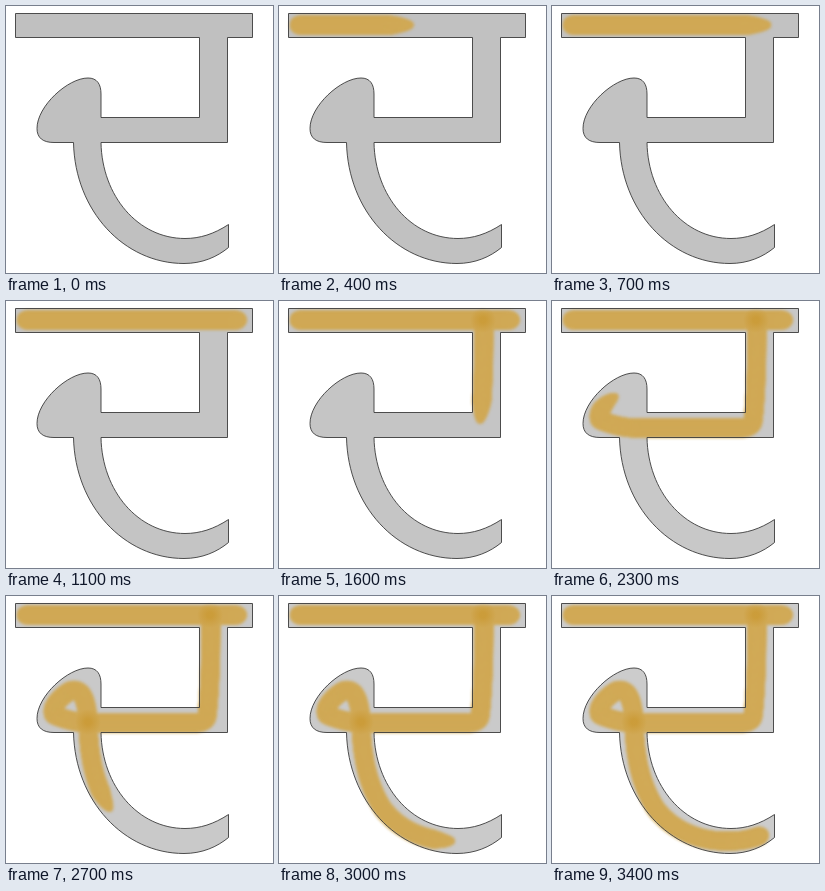
Animation of 267 by 267 pixels, one loop 3.5 s. Source, as an HTML page with a canvas:

```html
<!DOCTYPE html>
<html lang="en">
<head>
<meta charset="utf-8">
<title>Letter stroke order</title>
<style>
html, body { margin: 0; width: 100%; height: 100%; overflow: hidden; background: #fff; }
canvas { display: block; width: 267px; height: 267px; }
</style>
</head>
<body>
<canvas id="stage"></canvas>
<script>
const SIZE = 267, LOOP = 3500, STEP = 100;
const GOLD = 'rgb(209,167,78)';
const scale = window.devicePixelRatio || 1;

function prepare(canvas) {
  canvas.width = canvas.height = SIZE * scale;
  const c = canvas.getContext('2d');
  c.scale(scale, scale);
  return c;
}
const ctx = prepare(document.getElementById('stage'));
const inkCanvas = document.createElement('canvas');
const ink = prepare(inkCanvas);

const letter = new Path2D(
  'M9.5 7.5H246.5V31.5H221.5V136.5H95' +
  'C96 190 132 232.5 179 232.5C194 232.5 208 228 222.5 218.5V241.5' +
  'C211 251 196 257.5 178 257.5C118 257.5 69 205 67.5 136.5H48' +
  'C37 136.5 31 132 31 122.5C31 100 62 72 82 72C91 72 95 78 95 88' +
  'V111.5H193.5V31.5H9.5Z');

// Each stroke is a chain of legs: [path, start ms, end ms].
const strokes = [
  [['M20 19H236', 0, 770]],
  [
    ['M205 19C205 60 204 95 201 120', 1200, 1600],
    ['M201 120Q200 127 188 127L82 127Q65 126 48 119C44 112 54 101 64 95', 1600, 2300],
    ['M64 95C76 91 81 104 82 127C83 160 88 188 104 213', 2300, 2700],
    ['M104 213C122 236 150 246 178 245C192 245 203 242 212 238', 2700, 3150]
  ]
].map(legs => legs.map(([d, from, to]) => {
  const path = document.createElementNS('http://www.w3.org/2000/svg', 'path');
  path.setAttribute('d', d);
  const length = path.getTotalLength();
  const points = [];
  for (let s = 0; s <= length; s += 0.5) points.push(path.getPointAtLength(s));
  return { points, from, to };
}));

// Darker pools where the brush crosses its own trail: [x, y, start ms].
const pools = [[204, 19, 1250], [82, 126, 2450]];

function drawStroke(legs, t) {
  if (t <= legs[0].from) return;
  const trail = legs.flatMap(({ points, from, to }) => {
    const part = Math.min(1, Math.max(0, (t - from) / (to - from)));
    return points.slice(0, Math.round(points.length * part));
  });
  const moving = t < legs[legs.length - 1].to;
  const taper = moving ? 20 : 5;
  trail.forEach((p, i) => {
    const behind = (trail.length - 1 - i) / 2;
    const radius = 2 + 7.5 * Math.sqrt(Math.min(1, behind / taper));
    ink.beginPath();
    ink.arc(p.x, p.y, radius, 0, 2 * Math.PI);
    ink.fill();
  });
}

function drawPool([x, y, start], t) {
  if (t < start) return;
  const g = ctx.createRadialGradient(x, y, 3, x, y, 13);
  g.addColorStop(0, 'rgba(200,148,40,.6)');
  g.addColorStop(1, 'rgba(200,148,40,0)');
  ctx.fillStyle = g;
  ctx.fillRect(x - 13, y - 13, 26, 26);
}

function draw(t) {
  ctx.fillStyle = '#fff';
  ctx.fillRect(0, 0, SIZE, SIZE);
  const grey = Math.round(192 + 12 * t / LOOP);
  ctx.fillStyle = `rgb(${grey},${grey},${grey})`;
  ctx.fill(letter);

  ink.clearRect(0, 0, SIZE, SIZE);
  ink.fillStyle = GOLD;
  strokes.forEach(legs => drawStroke(legs, t));
  ctx.save();
  ctx.globalAlpha = 0.93;
  ctx.filter = `blur(${1.5 * scale}px)`;
  ctx.drawImage(inkCanvas, 0, 0, SIZE, SIZE);
  ctx.restore();
  pools.forEach(pool => drawPool(pool, t));

  ctx.strokeStyle = '#3c3c3c';
  ctx.lineWidth = 0.9;
  ctx.stroke(letter);
}

let shown = -1;
const begin = performance.now();
function tick() {
  const t = Math.floor(((performance.now() - begin) % LOOP) / STEP) * STEP;
  if (t !== shown) draw(shown = t);
  requestAnimationFrame(tick);
}
tick();
</script>
</body>
</html>
```
